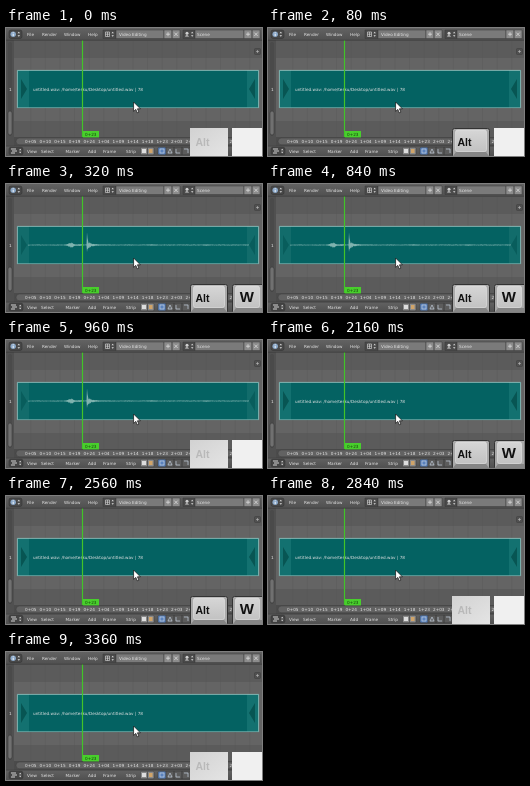
Write an HTML page that moves like this. It is 256 by 128 pixels and loops after 3.68 s.

```html
<!DOCTYPE html>
<html lang="en">
<head>
<meta charset="utf-8">
<title>Waveform toggle</title>
<style>
  html, body { margin: 0; width: 100%; height: 100%; overflow: hidden; background: #4d4d4d; }
  svg { display: block; width: 100vw; height: 100vh; }
  text { font: 4.2px "DejaVu Sans", sans-serif; fill: #e4e4e4; }
  .key { font-family: "Liberation Sans", Arial, sans-serif; font-weight: bold; fill: #111; }
</style>
</head>
<body>
<svg viewBox="0 0 256 128" xmlns="http://www.w3.org/2000/svg">
  <defs>
    <linearGradient id="bar" x2="0" y2="1">
      <stop stop-color="#626262"/><stop offset="1" stop-color="#505050"/>
    </linearGradient>
    <linearGradient id="cap" x2="0" y2="1">
      <stop stop-color="#d6d6d6"/><stop offset="1" stop-color="#c2c2c2"/>
    </linearGradient>
    <linearGradient id="pale" x2="1" y2="1">
      <stop stop-color="#d2d2d2"/><stop offset="1" stop-color="#e4e4e4"/>
    </linearGradient>
  </defs>

  <!-- channels -->
  <rect width="256" height="128" fill="#5b5b5b"/>
  <rect y="30" width="256" height="63" fill="#646464"/>
  <g id="grid" stroke="#575757" stroke-width=".3"></g>

  <!-- strip -->
  <rect x="11" y="42" width="242" height="38" fill="#046262"/>
  <g id="plain">
    <path d="M11 42h12v38h-12zM241 42h12v38h-12z" fill="#137170"/>
    <path d="M15 51l6 10-6 10zM249 51l-6 10 6 10z" fill="#075553"/>
    <text x="27" y="63" fill="#fff">untitled.wav: /home/tesku/Desktop/untitled.wav | 78</text>
  </g>
  <g id="wave">
    <path d="M11 42h12v38h-12zM241 42h12v38h-12z" fill="#126c6b"/>
    <path d="M15 51l6 10-6 10zM249 51l-6 10 6 10z" fill="#085d5c"/>
    <path id="sound" fill="#7fb3af"/>
  </g>
  <path d="M11.4 80V42.4H252.6V80" fill="none" stroke="#a3c6c3" stroke-width=".8"/>
  <path d="M11 79.6H253" stroke="#74aaa7" stroke-width=".8"/>

  <!-- scrollbars and ruler -->
  <rect y="12" width="8" height="106" fill="#505050"/>
  <rect x="2" y="14" width="4" height="94" rx="2" fill="#4a4a4a"/>
  <rect x="2" y="83" width="4" height="24" rx="2" fill="#707070" stroke="#333" stroke-width=".5"/>
  <text x="3" y="63" fill="#ccc">1</text>
  <rect x="8" y="109" width="248" height="9" fill="#4b4b4b"/>
  <rect x="10" y="110" width="244" height="6.8" rx="3.4" fill="#626262" stroke="#3d3d3d" stroke-width=".5"/>
  <g id="ruler"></g>

  <!-- playhead -->
  <rect x="75.9" y="12" width="1.2" height="97" fill="#42c428"/>
  <rect x="77" y="103" width="16" height="6.4" fill="#48cf2c"/>
  <text x="79" y="107.8" style="fill:#153d0d">0+23</text>
  <rect x="248.5" y="20.5" width="6" height="6" rx="1" fill="#505050" stroke="#3b3b3b" stroke-width=".5"/>
  <path d="M250 23.5h3M251.5 22v3" stroke="#bbb" stroke-width=".6"/>

  <!-- top header -->
  <rect width="256" height="12" fill="url(#bar)"/>
  <path d="M0 12.2H256" stroke="#383838" stroke-width=".7"/>
  <rect x="3" y="2" width="13" height="8.5" rx="2" fill="#474747" stroke="#303030" stroke-width=".5"/>
  <circle cx="7.2" cy="6.2" r="2.7" fill="#8ca9c9"/>
  <path d="M7.2 4.3v.8M7.2 5.8v2.2" stroke="#fff" stroke-width=".9"/>
  <path d="M11.5 5.3l1.3-1.6 1.3 1.6zM11.5 7.2l1.3 1.6 1.3-1.6z" fill="#ddd"/>
  <g id="topMenu"></g>
  <g stroke="#3a3a3a" stroke-width=".5">
    <path d="M97 2h13v8.5h-13zM177 2h12v8.5h-12z" fill="#4a4a4a"/>
    <path d="M110 2h48v8.5h-48zM189 2h49v8.5h-49z" fill="#7a7a7a"/>
    <path d="M158 2h8v8.5h-8zM166 2h8v8.5h-8zM238 2h8v8.5h-8zM246 2h8v8.5h-8z" fill="#8c8c8c"/>
  </g>
  <path d="M99.5 4h4v4.5h-4zM101.5 4v4.5M99.5 6.2h4" fill="none" stroke="#ddd" stroke-width=".6"/>
  <path d="M105.5 5.3l1.2-1.5 1.2 1.5zM105.5 7.2l1.2 1.5 1.2-1.5zM185 5.3l1.2-1.5 1.2 1.5zM185 7.2l1.2 1.5 1.2-1.5z" fill="#ddd"/>
  <circle cx="181" cy="5.2" r="1.5" fill="#d1d1d1"/>
  <path d="M179 8.8l1.6-3 2.6 3z" fill="#aaa"/>
  <path d="M160 6.2h4M162 4.2v4M168.3 4.6l3.4 3.4M171.7 4.6l-3.4 3.4M240 6.2h4M242 4.2v4M248.3 4.6l3.4 3.4M251.7 4.6l-3.4 3.4" stroke="#e4e4e4" stroke-width=".7"/>
  <text x="113" y="7.8" fill="#fff">Video Editing</text>
  <text x="191" y="7.8" fill="#fff">Scene</text>

  <!-- bottom header -->
  <rect y="118" width="256" height="10" fill="url(#bar)"/>
  <path d="M0 118.2H256" stroke="#3c3c3c" stroke-width=".6"/>
  <rect x="3" y="119.3" width="14" height="7.5" rx="1.8" fill="#444" stroke="#303030" stroke-width=".5"/>
  <path d="M5 121h5M6 123h5M5 125h4" stroke="#d0d0d0" stroke-width="1.1"/>
  <path d="M13 122.2l1.2-1.5 1.2 1.5zM13 123.8l1.2 1.5 1.2-1.5z" fill="#ddd"/>
  <g id="bottomMenu"></g>
  <g stroke="#383838" stroke-width=".5">
    <rect x="134.5" y="119.3" width="7" height="7.5" rx="1" fill="#8a8a8a"/>
    <rect x="141.5" y="119.3" width="6.5" height="7.5" rx="1" fill="#8a8a8a"/>
    <rect x="152" y="119.3" width="8" height="7.5" rx="1" fill="#5a82bd"/>
    <path d="M160 119.3h8v7.5h-8zM168 119.3h8v7.5h-8zM176 119.3h8v7.5h-8z" fill="#5c5c5c"/>
  </g>
  <path d="M136 121h4v4h-4z" fill="#ddd"/>
  <path d="M143 121h3.5v4h-3.5z" fill="#d0a469"/>
  <path d="M154 121h4v4h-4zM162 125l2-4 2 4zM170 121v4h4M178 121h4v4" fill="none" stroke="#c3cedd" stroke-width=".7"/>

  <!-- key display -->
  <g id="altOff">
    <rect x="184" y="100" width="38" height="28" fill="url(#pale)"/>
    <text class="key" x="189.5" y="118" style="font-size:10.5px;fill:#b9b9b9">Alt</text>
  </g>
  <rect id="wOff" x="226" y="100" width="30" height="28" fill="#f0f0f0"/>
  <g id="altOn">
    <rect x="184.5" y="100.5" width="37" height="29" rx="2" fill="#a9a9a9" stroke="#333"/>
    <path d="M185 128l3-4h30l3 4z" fill="#858585"/>
    <rect x="187.5" y="102" width="31" height="21.5" rx="2" fill="url(#cap)" stroke="#e4e4e4" stroke-width=".6"/>
    <text class="key" x="189.5" y="118" style="font-size:10.5px">Alt</text>
  </g>
  <g id="wOn">
    <rect x="226.5" y="100.5" width="32" height="29" rx="2" fill="#a9a9a9" stroke="#333"/>
    <path d="M227 128l3-4h26v4z" fill="#858585"/>
    <rect x="229.5" y="102" width="24" height="21.5" rx="2" fill="url(#cap)" stroke="#e4e4e4" stroke-width=".6"/>
    <text class="key" x="233.8" y="118.4" style="font-size:15px">W</text>
  </g>

  <path d="M127.6 74v9.4l2.2-2 1.5 3.4 1.6-.7-1.5-3.3h3z" fill="#fff" stroke="#111" stroke-width=".7"/>
</svg>
<script>
  const LOOP = 3680;
  const $ = id => document.getElementById(id);

  function add(parent, tag, attrs, label) {
    const el = document.createElementNS("http://www.w3.org/2000/svg", tag);
    for (const name in attrs) el.setAttribute(name, attrs[name]);
    if (label) el.textContent = label;
    parent.appendChild(el);
  }

  function menu(id, y, items) {
    for (const [x, label] of items) add($(id), "text", { x, y }, label);
  }
  menu("topMenu", 7.8, [[21, "File"], [36, "Render"], [58, "Window"], [82, "Help"]]);
  menu("bottomMenu", 124.7, [[21, "View"], [35, "Select"], [59.5, "Marker"], [82, "Add"], [97, "Frame"], [120, "Strip"]]);

  // Ruler labels read seconds+frames at 25 fps
  for (let i = 0; i < 16; i++) {
    const x = 19 + i * 14.6;
    const frame = Math.round(5 + i * 4.8);
    const label = Math.floor(frame / 25) + "+" + String(frame % 25).padStart(2, "0");
    add($("ruler"), "text", { x, y: 115 }, label);
    add($("grid"), "path", { d: `M${x + 5.7} 13V109` });
  }

  function soundPath() {
    let seed = 17;
    const rand = () => (seed = (seed * 16807) % 2147483647) / 2147483647;
    const bump = (x, at, size, width) => size * Math.exp(-(((x - at) / width) ** 2));
    const upper = [], lower = [];
    for (let x = 22; x <= 243; x += 0.5) {
      const hit = x < 81 ? 0 : 10 * Math.exp(81 - x) + 4 * Math.exp((81 - x) / 5);
      const size = bump(x, 65, 3.2, 3) + bump(x, 73, 0.8, 3) + bump(x, 146, 0.4, 4) + bump(x, 201, 0.4, 3) + hit;
      const reach = () => 0.25 + rand() * 0.2 + size * (0.25 + rand() * 0.65);
      upper.push(`${x} ${(61 - reach()).toFixed(2)}`);
      lower.unshift(`${x} ${(61 + reach()).toFixed(2)}`);
    }
    return "M" + upper.concat(lower).join("L") + "Z";
  }
  $("sound").setAttribute("d", soundPath());

  const within = (t, from, to) => t >= from && t < to;
  const show = (id, on) => $(id).setAttribute("visibility", on ? "visible" : "hidden");

  function draw(t) {
    const alt = within(t, 40, 960) || within(t, 1880, 2840);
    const w = within(t, 320, 960) || within(t, 2160, 2840);
    const wave = within(t, 320, 2160);
    show("altOn", alt);
    show("altOff", !alt);
    show("wOn", w);
    show("wOff", !w);
    show("wave", wave);
    show("plain", !wave);
  }

  const start = performance.now();
  function tick() {
    draw((performance.now() - start) % LOOP);
    requestAnimationFrame(tick);
  }
  draw(0);
  requestAnimationFrame(tick);
</script>
</body>
</html>
```
